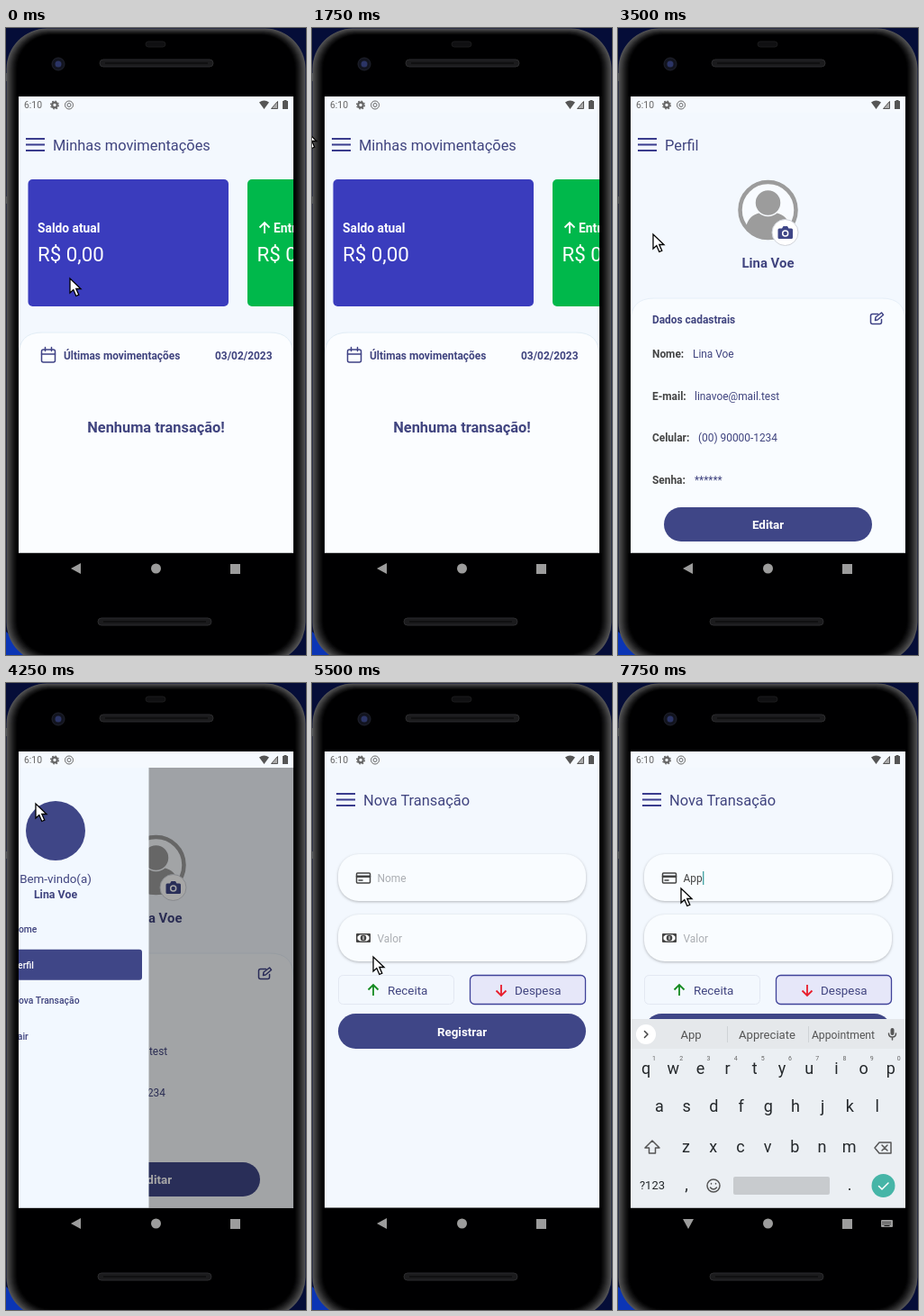
Write an HTML page that moves like this. It is 333 by 696 pixels and loops after 8000 ms.

```html
<!DOCTYPE html>
<html lang="pt-BR">
<head>
<meta charset="utf-8">
<style>
html, body { margin: 0; width: 100%; height: 100%; overflow: hidden; background: #050d38; }
svg { display: block; }
text { font-family: Roboto, sans-serif; fill: #40447f; white-space: pre; }
.title { font-size: 16.4px; }
.b { font-weight: 700; }
.s12 { font-size: 11.9px; }
.s13 { font-size: 13.4px; }
.mid text, text.mid { text-anchor: middle; }
.dark { fill: #444; }
.white, .white text { fill: #fff; }
.hint { fill: #aaadb2; }
.line { fill: none; stroke: currentColor; stroke-width: 1.5; stroke-linecap: round; stroke-linejoin: round; }
.item { color: #3f4285; }
.item text { font-size: 10.4px; font-weight: 500; }
.item.on { color: #fff; }
.item.on text { fill: #fff; }
.item rect.bg { fill: none; }
.item.on rect.bg { fill: #3f4687; }
.field { fill: #f9fcff; filter: drop-shadow(0 1px 1.5px #0004); }
#keys text { fill: #24282b; font-size: 18px; }
#keys .digit { font-size: 7px; fill: #666; }
#keys .word { font-size: 13.1px; fill: #555; }
</style>
</head>
<body>
<svg width="333" height="696" viewBox="0 0 333 696">
  <defs>
    <clipPath id="screen"><rect x="14" y="76" width="305" height="506.500"/></clipPath>
    <path id="burger" d="M0 123h21M0 129.500h21M0 136h21" stroke="#3a3c8d" stroke-width="2"/>
    <path id="up" d="M0 6V-6M-5.500-.5L0-6l5.500 5.500" fill="none" stroke="currentColor" stroke-width="1.8"/>
  </defs>

  <!-- phone body -->
  <path d="M0 670v26h30z" fill="#0b35b5"/>
  <path d="M0 50h3v9h-3zM0 187h3v8h-3z" fill="#555a66"/>
  <g id="rim"></g>
  <g fill="#1b1b1d" stroke="#2b2b2e">
    <rect x="104" y="35" width="126" height="8" rx="4"/>
    <rect x="102" y="655" width="126" height="8" rx="4"/>
    <rect x="155" y="15" width="22" height="6" rx="3" fill="#101012" stroke="#1a1a1c"/>
  </g>
  <path d="M110 39h114M108 659h114" stroke="#101011" stroke-width="2"/>
  <circle cx="58" cy="40" r="7" fill="#12141f" stroke="#20222d"/>
  <circle cx="58" cy="40" r="3.500" fill="#2b3465"/>

  <g clip-path="url(#screen)">
    <rect x="14" y="76" width="305" height="507" fill="#f3f8fe"/>

    <g class="page">
      <use href="#burger" x="22"/>
      <text class="title" x="52" y="136">Minhas movimentações</text>
      <g id="cards"></g>
      <path d="M14 590V364q0-26 26-26h253q26 0 26 26v226z" fill="#fbfdff" stroke="#e2edf6"/>
      <g class="line" color="#3f4285"><rect x="39.500" y="357" width="15" height="14" rx="2"/><path d="M39.500 362h15M43.500 354.500v4M50.500 354.500v4"/></g>
      <text class="b s12" x="64" y="368">Últimas movimentações</text>
      <text class="b s12" x="232" y="368">03/02/2023</text>
      <text class="b title mid" x="166.500" y="449">Nenhuma transação!</text>
    </g>

    <g class="page">
      <use href="#burger" x="22"/>
      <text class="title" x="52" y="136">Perfil</text>
      <g fill="#9c9c9c">
        <circle cx="166.500" cy="202" r="31" fill="#f8fbff" stroke="#9c9c9c" stroke-width="4.500"/>
        <path d="M142 222q2-14 16-17q8.500 6 17 0q14 3 16 17q-24 20-49 0z"/>
        <circle cx="166.500" cy="194" r="14.500" stroke="#f8fbff" stroke-width="1.500"/>
      </g>
      <circle cx="185.500" cy="227" r="14.500" fill="#fff" stroke="#d0d3da"/>
      <path d="M179 222.500h3l1.500-2.500h4.500l1.500 2.500h3q1.500 0 1.500 1.500v8.500q0 1.500-1.500 1.500h-13.500q-1.500 0-1.500-1.500v-8.500q0-1.500 1.500-1.500z" fill="#3f4687"/>
      <circle cx="185.700" cy="228" r="3" fill="#3f4687" stroke="#fff" stroke-width="1.500"/>
      <text class="b mid" x="166.500" y="266" font-size="14.9">Lina Voe</text>
      <path d="M14 590V326q0-26 26-26h253q26 0 26 26v264z" fill="#f9fcff" stroke="#e6eff8"/>
      <text class="b s12" x="38" y="328">Dados cadastrais</text>
      <g class="line" color="#3f4285"><path d="M288.500 317.500h-6q-2 0-2 2v7q0 2 2 2h8q2 0 2-2v-3"/><path d="M285.500 324.500l.5-3.500 6.500-5 2 2.500-6.500 5.500z"/></g>
      <g id="details"></g>
      <rect x="51" y="532" width="231" height="38" rx="19" fill="#3f4687"/>
      <text class="b s13 white mid" x="166.500" y="556">Editar</text>
    </g>

    <g class="page">
      <use href="#burger" x="27"/>
      <text class="title" x="57" y="136">Nova Transação</text>
      <rect class="field" x="29" y="190" width="275" height="52" rx="23"/>
      <rect class="field" x="29" y="257" width="275" height="52" rx="23"/>
      <g class="line" color="#444"><rect x="49.500" y="211" width="15" height="11" rx="1"/><path d="M50 214.700h14" stroke-width="2.500"/><path d="M52 219h4"/></g>
      <rect x="49" y="278" width="16" height="10" rx="1" fill="#444"/>
      <path d="M53 279.500h8l2.500 2v3l-2.500 2h-8l-2.500-2v-3z" fill="#fff"/>
      <circle cx="57" cy="283" r="3.300" fill="#444"/>
      <path d="M57 281v4" stroke="#fff"/>
      <text id="typed" class="s12" x="72.500" y="221"></text>
      <rect id="caret" y="209" width="1.200" height="15" fill="#30999a"/>
      <text class="s12 hint" x="72.500" y="287.500">Valor</text>
      <rect x="29.500" y="324.500" width="128" height="32" rx="5" fill="none" stroke="#e3e8f2"/>
      <rect x="175.500" y="324.500" width="128" height="32" rx="5" fill="#e6e7f9" stroke="#3f4299" stroke-width="1.300"/>
      <use href="#up" color="#148a21" transform="translate(68 341)"/>
      <use href="#up" color="#e81c2b" transform="translate(210 341) scale(1 -1)"/>
      <text class="s13" x="84" y="346">Receita</text>
      <text class="s13" x="225" y="346">Despesa</text>
      <rect x="29" y="367" width="275" height="39" rx="19.500" fill="#3f4687"/>
      <text class="b s13 white mid" x="166.500" y="392">Registrar</text>
    </g>

    <rect id="shade" x="14" y="94" width="305" height="489"/>
    <g id="drawer">
      <rect x="14" y="94" width="207.500" height="489" fill="#f2f8ff"/>
      <circle cx="118" cy="164" r="33" fill="#3f4687"/>
      <text class="s13 mid" x="118" y="221.500">Bem-vindo(a)</text>
      <text class="b mid" x="118" y="239" font-size="12.4">Lina Voe</text>
      <rect id="press" x="21" y="296" width="173" height="33.500" rx="3" fill="#a2a5aa"/>
      <g id="menu"></g>
    </g>

    <g id="keys" class="mid">
      <rect x="14" y="373" width="305" height="210" fill="#ebeff3"/>
      <rect x="14" y="373" width="305" height="33" fill="#e5e8eb"/>
      <circle cx="31" cy="390" r="11" fill="#fff"/>
      <path class="line" color="#444" d="M29.500 386.500l3.500 3.500-3.500 3.500"/>
      <path d="M121.500 381v18M211.500 381v18" stroke="#cfd3d6"/>
      <text class="word" x="81" y="395">App</text>
      <text class="word" x="165.500" y="395">Appreciate</text>
      <text class="word" x="250" y="395" style="font-size:12.2px">Appointment</text>
      <rect x="302.500" y="383" width="4" height="8" rx="2" fill="#555"/>
      <path class="line" color="#555" d="M300.500 389q0 4 4 4t4-4M304.500 393v3"/>
      <g id="letters"></g>
      <g class="line" color="#555">
        <path d="M38 508l-8 8h4.500v6h7v-6h4.500z"/>
        <path d="M290 510h13v12h-13l-5-6zM293 513l6 6M299 513l-6 6"/>
        <circle cx="106" cy="558" r="7"/><path d="M102.500 560q3.500 4 7 0M103.500 555.500v.5M108.500 555.500v.5"/>
      </g>
      <text x="38" y="562" style="font-size:13px">?123</text>
      <text x="76" y="563">,</text>
      <text x="257" y="563">.</text>
      <rect x="128" y="548" width="107" height="20" rx="2" fill="#c8cbce"/>
      <circle cx="294.500" cy="558" r="13" fill="#46b5a7"/>
      <path class="line" color="#fff" d="M289.500 558.500l3.500 3.500 7-7"/>
    </g>

    <!-- status bar -->
    <rect x="14" y="76" width="305" height="18" fill="#f5f9fe"/>
    <text x="20" y="89" font-size="10.4" style="fill:#666">6:10</text>
    <g fill="none" stroke="#666">
      <circle cx="54" cy="85.500" r="2.800" stroke-width="2.200"/>
      <circle cx="54" cy="85.500" r="4.400" stroke-width="1.300" stroke-dasharray="1.700 1.755"/>
      <circle cx="70" cy="85.500" r="4.500"/><circle cx="70" cy="85.500" r="2"/>
    </g>
    <path d="M281 82.500q5.500-4 11 0l-5.500 7.500zM308.500 80h3v1h1.500v9h-6v-9h1.500z" fill="#555"/>
    <path d="M294.500 89.500h7v-8z" fill="#aaa" stroke="#555"/>
  </g>

  <!-- navigation bar -->
  <g fill="#9c9c9c">
    <path id="back" d="M72 600l11-6v12z"/>
    <circle cx="166.500" cy="600" r="5.500"/>
    <rect x="249" y="595" width="11" height="11"/>
    <g id="switcher"><rect x="292" y="596" width="13" height="8" rx="1"/><path d="M293.500 598.500h10M293.500 600.500h10" stroke="#000" stroke-dasharray="1 1"/><path d="M295.500 602.500h6" stroke="#000"/></g>
  </g>

  <path id="cursor" d="M0 0V16l3.800-3.500 3 7 3-1.300-3-6.700h5.200z" fill="#fff" stroke="#000" stroke-width="1.300"/>
</svg>

<script>
const $ = id => document.getElementById(id);
const pages = document.querySelectorAll('.page');

// metallic edge: nested outlines fading to black
$('rim').innerHTML = Array.from({ length: 13 }, (_, i) => {
  const tone = Math.round(84 * (1 - i / 12) ** 1.3);
  return `<rect x="${i + .5}" y="${i * .6 + .5}" width="${332 - 2 * i}" height="${704 - 1.4 * i}" rx="${45 - i * .6}" fill="rgb(${tone},${tone},${tone + 1})"/>`;
}).join('');

$('cards').innerHTML = [['#3a3cbd', 'Saldo atual'], ['#00b84b', 'Entradas'], ['#e0323c', 'Saídas']].map(([color, label], i) => `
  <g class="white" transform="translate(${24.5 + i * 243.5} 168)">
    <rect width="222.500" height="141" rx="5" fill="${color}"/>
    ${i ? `<use href="#up" color="#fff" transform="translate(19 54) scale(1 ${i > 1 ? -1 : 1})"/>` : ''}
    <text class="b" x="${i ? 29 : 10.5}" y="59" font-size="13.8">${label}</text>
    <text x="10.500" y="91" font-size="22.300">R$ 0,00</text>
  </g>`).join('');

$('details').innerHTML = [['Nome:', 'Lina Voe', 83], ['E-mail:', 'linavoe@mail.test', 85], ['Celular:', '(00) 90000-1234', 89], ['Senha:', '******', 85]]
  .map(([label, value, x], i) => `<text class="s12" y="${366 + i * 46.5}"><tspan class="b dark" x="38">${label}</tspan><tspan x="${x}">${value}</tspan></text>`).join('');

$('menu').innerHTML = [
  ['Home', 'M-7-1L0-8l7 7v9h-14zM-3 8v-8h6v8'],
  ['Perfil', 'M-7 8v-1q0-5 5-5h4q5 0 5 5v1M-3.500-4a3.500 3.500 0 1 0 7 0a3.500 3.500 0 1 0-7 0'],
  ['Nova Transação', 'M-7.500-6h15q1.500 0 1.500 1.500v9q0 1.500-1.500 1.500h-15q-1.500 0-1.500-1.500v-9q0-1.500 1.500-1.500zM-9-2h18'],
  ['Sair', 'M-3-7h-4v14h4M-2 0h10M4-4l4 4-4 4']
].map(([label, icon], i) => `
  <g class="item" transform="translate(0 ${273 + i * 39.7})">
    <rect class="bg" x="21" y="-17" width="193" height="34" rx="3"/>
    <path class="line" transform="translate(36.500 0)" d="${icon}"/>
    <text x="69.500" y="4">${label}</text>
  </g>`).join('');
const items = document.querySelectorAll('.item');

$('letters').innerHTML = [['qwertyuiop', 31, 434], ['asdfghjkl', 46, 476], ['zxcvbnm', 75.5, 521]].map(([row, x, y], r) =>
  [...row].map((key, i) => {
    const kx = x + i * 30.2;
    return `<text x="${kx}" y="${y}">${key}</text>` + (r ? '' : `<text class="digit" x="${kx + 9}" y="419">${(i + 1) % 10}</text>`);
  }).join('')).join('');

// keyframes: [time, ...values]
const cursorKeys = [[0, 71, 278], [250, 28, 272], [500, 4, 266], [750, 30, 264], [1000, 110, 268], [1250, 60, 240], [1500, 14, 170],
  [1750, -7, 114], [2000, 27, 128], [2500, 34, 142], [2750, 75, 275], [3000, 86, 318], [3250, 66, 290], [3500, 39, 229],
  [4000, 32, 130], [4250, 33, 134], [4750, 64, 330], [5000, 68, 352], [5250, 68, 340], [5500, 68, 304], [6000, 76, 250], [6250, 80, 218],
  [7250, 78, 222], [7500, 73, 226], [7750, 70, 228]];
const scrollKeys = [[0, 0], [250, 70], [500, 243], [750, 426], [1000, 250], [1250, 30], [1500, 1]];
const drawerKeys = [[2000, 0], [2250, .7], [2500, 1], [3000, 1], [3250, .45], [3500, 0], [4000, 0], [4250, .7], [4500, 1], [5000, 1], [5250, .45], [5500, 0]];
const keyboardKeys = [[6250, 0], [6500, .5], [6750, 1]];

function at(keys, t) {
  const next = keys.findIndex(k => k[0] > t);
  if (next < 0) return keys[keys.length - 1].slice(1);
  if (!next) return keys[0].slice(1);
  const a = keys[next - 1], b = keys[next], p = (t - a[0]) / (b[0] - a[0]);
  return a.slice(1).map((v, i) => v + (b[i + 1] - v) * p);
}

const move = (id, x, y) => $(id).setAttribute('transform', `translate(${x} ${y})`);
const show = (el, on) => el.style.display = on ? '' : 'none';

function draw(t) {
  const page = t < 3250 ? 0 : t < 5250 ? 1 : 2;
  const [drawer] = at(drawerKeys, t), [keyboard] = at(keyboardKeys, t);
  pages.forEach((p, i) => show(p, i === page));
  items.forEach((item, i) => item.classList.toggle('on', i === page));
  move('cards', -at(scrollKeys, t)[0], 0);
  move('drawer', (drawer - 1) * 210, 0);
  $('shade').style.opacity = drawer / 2;
  show($('press'), t === 3000);
  move('keys', 0, (1 - keyboard) * 212);
  show($('switcher'), keyboard);
  $('back').setAttribute('transform', keyboard ? 'rotate(-90 78 600)' : '');
  move('cursor', ...at(cursorKeys, t));

  const word = 'App'.slice(0, Math.max(0, (t - 6750) / 250));
  $('typed').textContent = word || 'Nome';
  $('typed').setAttribute('class', word ? 's12 dark' : 's12 hint');
  if (page === 2) $('caret').setAttribute('x', 73 + (word ? $('typed').getComputedTextLength() : 0));
  show($('caret'), t >= 6500 && t !== 7500);
}

function tick() {
  draw(Math.floor(performance.now() % 8000 / 250) * 250);
  requestAnimationFrame(tick);
}
tick();
</script>
</body>
</html>
```
